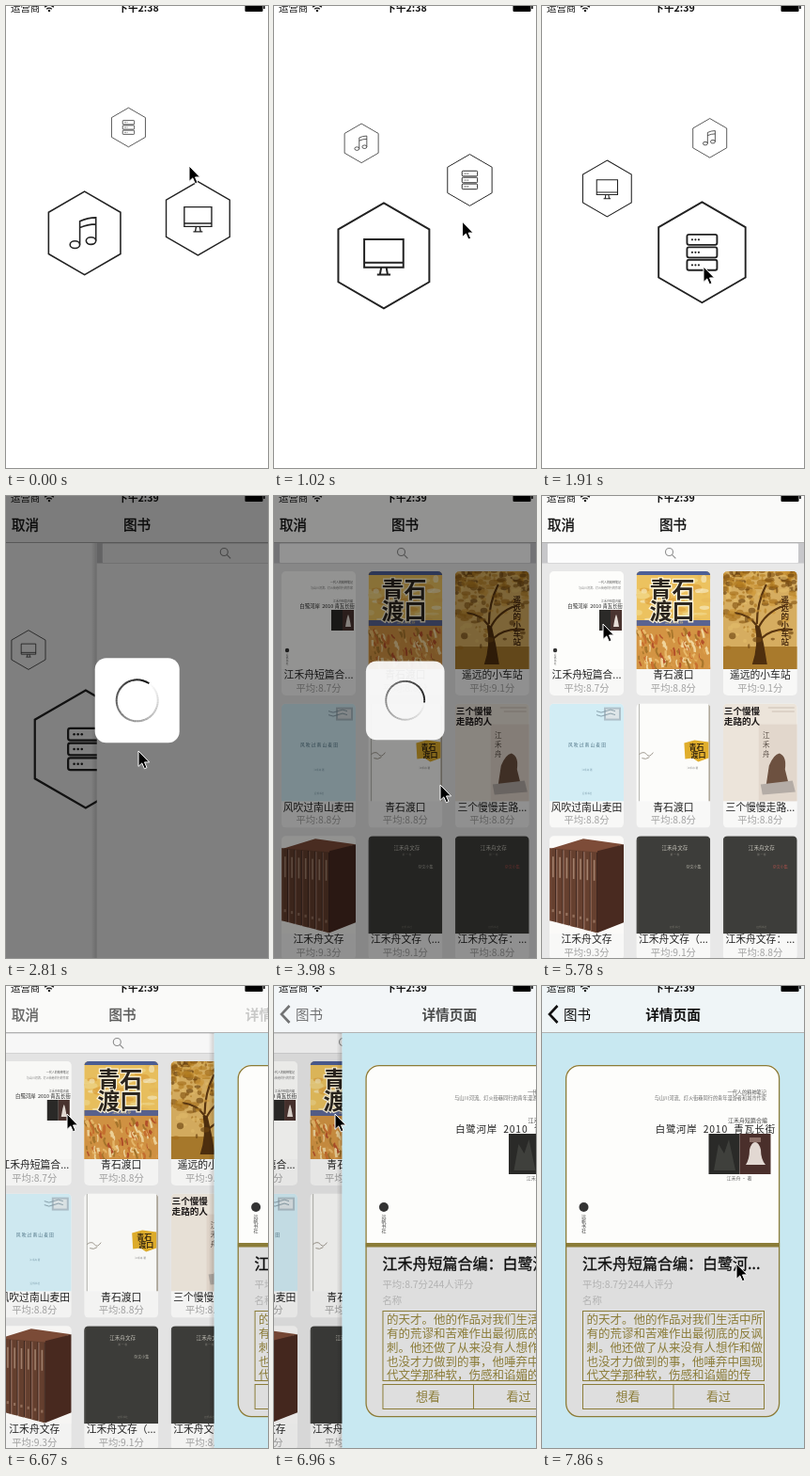
These frames come from a looping animation (279x491 px, 8 s). An HTML page:

```html
<!DOCTYPE html>
<html lang="zh">
<head>
<meta charset="utf-8">
<title>Book shelf</title>
<style>
html, body { margin: 0; width: 100%; height: 100%; overflow: hidden; background: #fff; }
svg { display: block; }
#stage { width: 100vw; height: 100vh; }
text { font-family: "Noto Sans CJK SC", "Noto Sans", sans-serif; white-space: pre; }
</style>
</head>
<body>
<svg id="stage" viewBox="0 0 279 491"></svg>
<script>
const W = 279, H = 491, OLIVE = '#8b7c38', INK = '#222';

// ---- markup helpers
const rect = (x, y, w, h, fill, more = '') =>
  `<rect x="${x}" y="${y}" width="${w}" height="${h}" fill="${fill}" ${more}/>`;
const path = (d, stroke, width = 1, more = 'fill="none"') =>
  `<path d="${d}" stroke="${stroke}" stroke-width="${width}" ${more}/>`;
const shape = (d, fill) => `<path d="${d}" fill="${fill}"/>`;
const oval = (x, y, rx, ry, fill, more = '') =>
  `<ellipse cx="${x}" cy="${y}" rx="${rx}" ry="${ry}" fill="${fill}" ${more}/>`;
// y is the middle of the line
const text = (x, y, size, str, fill = INK, more = '') =>
  `<text x="${x}" y="${y + size * 0.37}" font-size="${size}" fill="${fill}" ${more}>${str}</text>`;
const MID = 'text-anchor="middle"', END = 'text-anchor="end"';
const MEDIUM = 'stroke="#111" stroke-width=".35"';
const column = (x, y, size, step, str, fill, more = '') =>
  [...str].map((c, i) => text(x, y + i * step, size, c, fill, MID + ' ' + more)).join('');
const group = (id, body, more = '') => `<g id="${id}" ${more}>${body}</g>`;
const many = (n, make) => Array.from({ length: n }, (_, i) => make(i)).join('');

function random(seed) {
  return () => (seed = (seed * 16807) % 2147483647) / 2147483647;
}

// ---- carousel
const icons = {
  music:
    path('M-6.1 14.6V-15.2Q4-20 14.6-20V9.7M-6.1-7Q4-11.5 14.6-11.5', INK, 1.9) +
    oval(-12.4, 14.8, 6.3, 4.6, 'none', `stroke="${INK}" stroke-width="1.9"`) +
    oval(8.3, 9.9, 6.3, 4.6, 'none', `stroke="${INK}" stroke-width="1.9"`),
  screen:
    path('M-19.9-16.5H19.9V11.9H-19.9ZM-19.9 7.2H19.9M-2.6 12L-3.8 18.6M2.6 12L3.8 18.6M-6.8 19.4H6.8', INK, 1.9),
  server: [-19, -5.5, 8].map(y =>
    rect(-16, y, 32, 11, 'none', `rx="2" stroke="${INK}" stroke-width="1.9"`) +
    [-10.5, -7, -3.5].map(x => oval(x, y + 5.5, 1.1, 1.1, INK)).join('')).join('')
};
const hexagon = path('M0-53.5L46.3-26.75V26.75L0 53.5L-46.3 26.75V-26.75Z', INK, 1.9);

// ---- book covers, 79 x 104
function storyCover() {
  return rect(0, 0, 79, 104, '#fdfdfb') +
    text(76, 12, 3, '一代人的精神笔记', '#555', END) +
    text(76, 18, 3, '与山川河流、灯火街巷同行的作家', '#777', END) +
    text(76, 32, 3, '江禾舟短篇合编', '#555', END) +
    text(78, 37, 5.4, '白鹭河岸  2010 青瓦长街', INK, END) +
    rect(53, 41, 12, 22, '#2b2a28') + rect(65, 41, 12, 22, '#4a3430') +
    shape('M68 59Q70 47 71 46Q72 47 74 59Z', '#e6ddd6') +
    oval(6, 84, 2.2, 2.2, '#333') + column(6, 89, 2.6, 3, '远帆书社', '#444');
}
function ferryCover() {
  const r = random(11), gold = ['#f3d98c', '#dfa23c', '#f7e8bd', '#e8b95a'];
  const mural = ['#b4512a', '#f0d49a', '#c8702f', '#e9b96a', '#a8762c', '#d99a48'];
  return rect(0, 0, 79, 104, '#ecc25f') +
    many(50, () => oval(r() * 79, r() * 56, 2 + r() * 6, 1 + r() * 3, gold[r() * 4 | 0], 'opacity=".7"')) +
    rect(0, 0, 79, 4, '#4d5f95') + rect(0, 52, 79, 6, '#5a6390') +
    text(40, 55, 4, '江禾舟文存', '#efd58a', MID) + rect(0, 58, 79, 46, '#d39443') +
    many(110, () => {
      const x = r() * 79, y = 60 + r() * 42;
      return path(`M${x} ${y}q${r() * 8 - 4} ${r() * 6} ${r() * 4} ${3 + r() * 7}`, mural[r() * 6 | 0], 1 + r() * 2.5);
    }) +
    ['青石', '渡口'].map((s, i) => text(38, 19 + i * 23, 24, s, '#2c261f',
      MID + ' font-weight="700" stroke="#fff6dc" stroke-width="2.5" paint-order="stroke"')).join('');
}
function treeCover() {
  const r = random(5), tint = ['#a8701c', '#8a5a16', '#cf9a3c', '#b98224', '#6f4512', '#e3bd6a'];
  const leaves = n => many(n, () =>
    oval(r() * 79, r() * r() * 90, 1 + r() * 4, 1 + r() * 2.5, tint[r() * 6 | 0], 'opacity=".65"'));
  return rect(0, 0, 79, 104, '#d6ad60') + rect(0, 80, 79, 24, '#a97a2c') + leaves(150) +
    path('M37 96Q42 74 36 58Q28 46 12 44M37 62Q44 44 66 36M36 56Q36 34 46 14M40 72Q52 60 74 62', '#5a3610', 2.2) +
    shape('M31 99Q38 78 34 58L39 58Q44 78 47 99Z', '#4f2f0e') + leaves(80) +
    column(66, 30, 8.5, 9, '遥远的小车站', '#4a2c10', 'font-weight="700"');
}
function fieldCover() {
  return rect(0, 0, 79, 104, '#d2edf5') +
    rect(58, 4, 18, 14, '#aebfc8') + rect(60, 6, 14, 10, '#dde5e8') +
    path('M50 8q5 3 10 0t10 0M50 12q5 3 10 0t10 0', '#78909c', 0.8) +
    text(40, 44, 4.8, '风 吹 过 南 山 麦 田', '#4f7486', MID) +
    text(40, 70, 2.6, '江禾舟 著', '#7d9cab', MID) + text(40, 95, 2.6, '远帆书社', '#7d9cab', MID);
}
function plainCover() {
  return rect(0, 0, 79, 104, '#fcfcfa') + rect(2.5, 0, 1.2, 104, '#bdbdb8') +
    rect(77, 0, 2, 104, '#b0a99c') +
    shape('M51 42L62 39L77 41V58L66 62L60 58L52 59Z', '#e0ae2c') +
    text(64, 46, 8, '青石', '#3a2a10', MID + ' font-weight="900"') +
    text(66, 54, 8, '渡口', '#3a2a10', MID + ' font-weight="900"') +
    path('M3 54q5-4 8 0t7-2M6 58q4 2 8-1', '#a09a90', 1) +
    text(54, 68, 2.8, '江禾舟 著', '#888');
}
function walkCover() {
  return rect(0, 0, 79, 104, '#ece4da') + rect(38, 22, 41, 82, '#e2d7cc') +
    rect(48, 4, 28, 0.8, '#c4b6aa') + rect(52, 8, 24, 0.8, '#c4b6aa') +
    text(1, 8, 9.6, '三个慢慢', '#1c1818', 'font-weight="900"') +
    text(1, 19, 9.6, '走路的人', '#1c1818', 'font-weight="900"') +
    column(46, 34, 7.5, 10, '江禾舟', '#5b5048') +
    shape('M46 86L49 66Q54 54 60 53Q68 56 66 70L70 86Z', '#6d5140') +
    shape('M40 86L74 82L77 94L42 97Z', '#b4aca6');
}
function boxCover() {
  return rect(0, 0, 79, 104, '#fbfaf8') +
    shape('M0 14L36 3L79 9L51 18Z', '#7d4c38') +
    shape('M51 16L79 9V92L51 103Z', '#492a20') +
    many(7, i => {
      const x = i * 7.3, top = 13 + i * 0.6, end = 90 + i * 1.9;
      return shape(`M${x} ${top}L${x + 7} ${top + 0.6}V${end + 1.8}L${x} ${end}Z`, '#66402f') +
        rect(x + 0.3, top + 1, 0.9, end - top - 1, '#8d6250') + rect(x + 6.3, top + 1, 0.9, end - top, '#38211a') +
        rect(x + 3, top + 9, 1.6, 22, '#a2806c') + rect(x + 2.6, end - 12, 2.2, 3, '#94705c');
    });
}
function darkCover(accent) {
  return rect(0, 0, 79, 104, '#3d3d3a') + rect(0, 0, 2, 104, '#474744') +
    text(41, 13, 5.6, '江禾舟文存', '#c4c2b9', MID) + text(41, 20, 2.8, '第 一 卷', '#85837c', MID) +
    text(61, 33, 4, '杂文小集', accent, MID) + text(41, 97, 2.8, '远帆书社', '#747269', MID);
}

const books = [
  ['江禾舟短篇合...', 8.7, storyCover()], ['青石渡口', 8.8, ferryCover()], ['遥远的小车站', 9.1, treeCover()],
  ['风吹过南山麦田', 8.8, fieldCover()], ['青石渡口', 8.8, plainCover()], ['三个慢慢走路...', 8.8, walkCover()],
  ['江禾舟文存', 9.3, boxCover()], ['江禾舟文存（...', 9.1, darkCover('#b5b3a9')], ['江禾舟文存：...', 8.8, darkCover('#a8504a')]
];
const cell = ([name, score, cover], i) =>
  `<g transform="translate(${8 + (i % 3) * 92.4} ${80 + Math.floor(i / 3) * 140.6})"><g clip-path="url(#cell)">` +
  rect(0, 0, 79, 132, '#f8f8f7') + `<svg width="79" height="104">${cover}</svg></g>` +
  text(39.5, 110, 10.8, name, INK, MID) + text(39.5, 124, 10.3, `平均:${score}分`, '#a2a2a2', MID) + '</g>';

const lens = (x, y) => oval(x, y, 4, 4, 'none', 'stroke="#8e8e8e" stroke-width="1.1"') +
  path(`M${x + 2.9} ${y + 2.9}l4 4`, '#8e8e8e', 1.2);
const edge = rect(-6, 50, 6, H - 50, 'url(#edge)');

// ---- detail page
const review = ['的天才。他的作品对我们生活中所', '有的荒谬和苦难作出最彻底的反讽', '刺。他还做了从来没有人想作和做',
  '也没才力做到的事，他唾弃中国现', '代文学那种软，伤感和谄媚的传'];
const detail = edge + rect(0, 0, W, H, '#c8e8f1') +
  '<g clip-path="url(#card)">' + rect(25, 84, 228, 374, '#dedede') + rect(25, 84, 228, 190, '#fdfdfb') +
  rect(25, 273, 228, 4.5, OLIVE) + '</g>' +
  rect(25.6, 84.6, 227, 373, 'none', `rx="14" stroke="${OLIVE}" stroke-width="1.3"`) +
  text(239, 113, 5.2, '一代人的精神笔记', '#555', END) +
  text(239, 119, 5.2, '与山川河流、灯火街巷同行的青年漫游者和城市作家', '#666', END) +
  text(240, 143, 6, '江禾舟短篇合编', '#444', END) +
  text(249, 152, 10.4, '白鹭河岸  2010  青瓦长街', INK, END + ' letter-spacing=".8"') +
  rect(177.5, 157, 33, 43, '#2a2a28') + rect(210.5, 157, 33, 43, '#4a2f2b') +
  shape('M183 196L188 168L194 178L199 163L206 196Z', '#3f403c') +
  shape('M217 190Q221 184 221 174Q223 166 227 166Q231 166 233 174Q233 184 238 190Z', '#e2d8d2') +
  rect(221, 161, 12, 5, '#8c7068') + text(210, 204, 5, '江禾舟 · 著', '#666', MID) +
  oval(44.5, 235, 5, 5, '#333') + column(44.5, 245, 5, 5.2, '远帆书社', '#444') +
  text(43, 295, 16, '江禾舟短篇合编：白鹭河...', '#111', MEDIUM) +
  text(43, 317, 10.4, '平均:8.7分244人评分', '#b2b2b2') + text(43, 334.5, 10.4, '名称', '#b2b2b2') +
  rect(43.5, 345.5, 193, 74, 'none', `stroke="${OLIVE}"`) +
  review.map((s, i) => text(47.5, 354.5 + i * 14.8, 12.5, s, OLIVE)).join('') +
  rect(43.5, 423.5, 193, 26, 'none', `stroke="${OLIVE}"`) + rect(139.5, 423, 1, 27, OLIVE) +
  text(91.5, 436.5, 13, '想看', OLIVE, MID) + text(188, 436.5, 13, '看过', OLIVE, MID);

// ---- spinner: dark head at the top, tail fading counterclockwise
const spinner = many(60, i => {
  const p = a => `${22 * Math.sin(a)} ${-22 * Math.cos(a)}`, a = -i * Math.PI / 30;
  return path(`M${p(a)}A22 22 0 0 0 ${p(a - 0.115)}`, '#111', 2, `fill="none" opacity="${(1 - i / 60) ** 1.1}"`);
});

const stage = document.getElementById('stage');
stage.innerHTML = `<defs>
  <clipPath id="cell"><rect width="79" height="132" rx="5"/></clipPath>
  <clipPath id="card"><rect x="25" y="84" width="228" height="374" rx="14"/></clipPath>
  <linearGradient id="edge"><stop offset="0" stop-opacity="0"/><stop offset="1" stop-opacity=".16"/></linearGradient></defs>` +
  rect(0, 0, W, H, '#fff') +
  group('home', Object.entries(icons).map(([id, icon]) => group(id, hexagon + icon)).join('')) +
  group('list', edge + rect(0, 0, W, H, '#fff') +
    group('shelf', rect(0, 71, W, H - 71, '#e8e8e8') + books.map(cell).join('')) +
    rect(0, 50, W, 21.5, '#c7c7ca') + rect(6, 50.5, 267, 20.5, '#fcfcfc', 'rx="1"') + lens(135.5, 59.5) +
    group('shade', rect(0, 50, W, H, '#000'))) +
  group('detail', detail) +
  group('nav', rect(0, 0, W, 49.5, '#fafaf9') + group('tint', rect(0, 0, W, 49.5, '#eff5f7')) +
    rect(0, 49, W, 1, '#b2b2b2') +
    group('cancel', text(6, 30.5, 14.5, '取消', '#111', MEDIUM)) +
    group('shelfName', text(0, 30.5, 14.5, '图书', '#111', MID + ' ' + MEDIUM)) +
    group('back', path('M16.5 21L8 30L16.5 39', '#111', 2.6) + text(37.5, 30.5, 14.5, '图书', '#111', MID)) +
    group('pageName', text(0, 30.5, 14.7, '详情页面', '#111', MID + ' font-weight="700"'))) +
  text(5, 2, 10.4, '运营商', '#111') +
  path('M41.2 1.2Q46-3 50.8 1.2M43.2 3.2Q46 1 48.8 3.2', '#111', 1.3) + oval(46, 5, 1.2, 1.2, '#111') +
  `<text id="clock" x="141" y="6" font-size="10.6" font-weight="700" fill="#111" ${MID}></text>` +
  rect(254.5, -4, 19, 10, '#000', 'rx="1"') + rect(274.2, -1, 1.5, 4, '#000') +
  group('dim', rect(0, 0, W, H, '#000')) +
  group('hud', rect(-45, -45, 90, 90, '#fff', 'rx="12"') + group('spin', spinner)) +
  group('cursor', path('M0 0V16.4L3.8 12.9L6.4 18.8L9 17.6L6.5 11.9H11.6Z', '#fff', 1, 'fill="#000"'));

// ---- timing
const shortTicks = new Set([0, 2, 6, 10, 19, 22, 25, 42, 49, 53]);
const ticks = [];
let loop = 0;
for (let i = 0; i < 54; i++) {
  ticks.push(loop);
  loop += shortTicks.has(i) ? 140 : 150;
}

// linear reading of column c in rows of [time, ...values]
function at(t, rows, c = 1) {
  const i = rows.findIndex(r => r[0] > t);
  if (i === 0) return rows[0][c];
  if (i < 0) return rows[rows.length - 1][c];
  const a = rows[i - 1], b = rows[i];
  return a[c] + (b[c] - a[c]) * (t - a[0]) / (b[0] - a[0]);
}
const spring = ms => {
  if (ms <= 0) return 0;
  const x = ms * 0.012;
  return x > 9 ? 1 : 1 - (1 + x) * Math.exp(-x);
};

const turn = [[0, 187.4], [1910, 26.1], [2060, 12], [2210, 3.5], [2360, 0]];
const dimming = [[2510, 0], [2660, 0.25], [2810, 0.5], [3830, 0.5], [3980, 0.42], [4130, 0]];
const hudPose = [[2510, 0, 1.3], [2660, 0.5, 1.12], [2810, 1, 1], [3830, 1, 1], [3980, 0.92, 0.93], [4130, 0, 0.85]];
const pointer = [[0, 195, 170], [600, 207, 200], [1320, 196, 250], [1910, 172, 277], [2360, 141, 271], [2810, 141, 271],
  [3680, 177, 307], [4430, 177, 307], [4880, 122, 168], [5330, 70, 140], [5480, 70, 140], [5780, 65, 136],
  [6970, 65, 136], [7710, 172, 247], [7860, 207, 295]];

const $ = id => document.getElementById(id);
const place = (id, x, y = 0, more = '') => $(id).setAttribute('transform', `translate(${x} ${y}) ${more}`);
const fade = (id, v) => {
  $(id).setAttribute('opacity', v);
  $(id).style.display = v > 0 ? '' : 'none';
};

function draw(t) {
  const open = spring(t - 2624), push = spring(t - 6600);

  ['music', 'screen', 'server'].forEach((id, i) => {
    const deg = at(t, turn) + 120 + i * 120, rad = deg * Math.PI / 180;
    const off = Math.abs(((deg + 180) % 360 + 360) % 360 - 180);
    const size = Math.max(20.8, 62.5 - 0.347 * off);
    place(id, 139.5 + 70.3 * Math.sin(rad), 198.7 + 70.3 * Math.cos(rad), `scale(${size / 53.5})`);
  });
  place('home', -0.3 * W * open);

  fade('list', open > 0 ? 1 : 0);
  place('list', W * (1 - open) - 0.3 * W * push);
  fade('shelf', t >= 3830 ? 1 : 0);
  fade('shade', 0.1 * push);
  fade('detail', push > 0 ? 1 : 0);
  place('detail', W * (1 - push));

  fade('nav', at(t, [[2510, 0], [2660, 0.5], [2810, 1]]));
  fade('tint', push * push);
  fade('cancel', Math.max(0, 1 - 1.7 * push));
  fade('shelfName', Math.max(0, 1 - 1.5 * push));
  place('shelfName', 139.5 - 75 * push);
  fade('back', Math.max(0, (push - 0.4) / 0.6));
  fade('pageName', push);
  place('pageName', 139.5 + 182 * (1 - push));
  $('clock').textContent = t < 1610 ? '下午2:38' : '下午2:39';

  fade('dim', at(t, dimming));
  fade('hud', at(t, hudPose));
  place('hud', 139.7, 217.3, `scale(${at(t, hudPose, 2)})`);
  place('spin', 0, 0, `rotate(${35 + (t - 2810) * 0.36})`);
  place('cursor', at(t, pointer), at(t, pointer, 2));
}

let shown = -1;
const begin = performance.now();
function run() {
  const now = (performance.now() - begin) % loop;
  const t = ticks.filter(s => s <= now).pop();
  if (t !== shown) draw(shown = t);
  requestAnimationFrame(run);
}
run();
</script>
</body>
</html>
```
